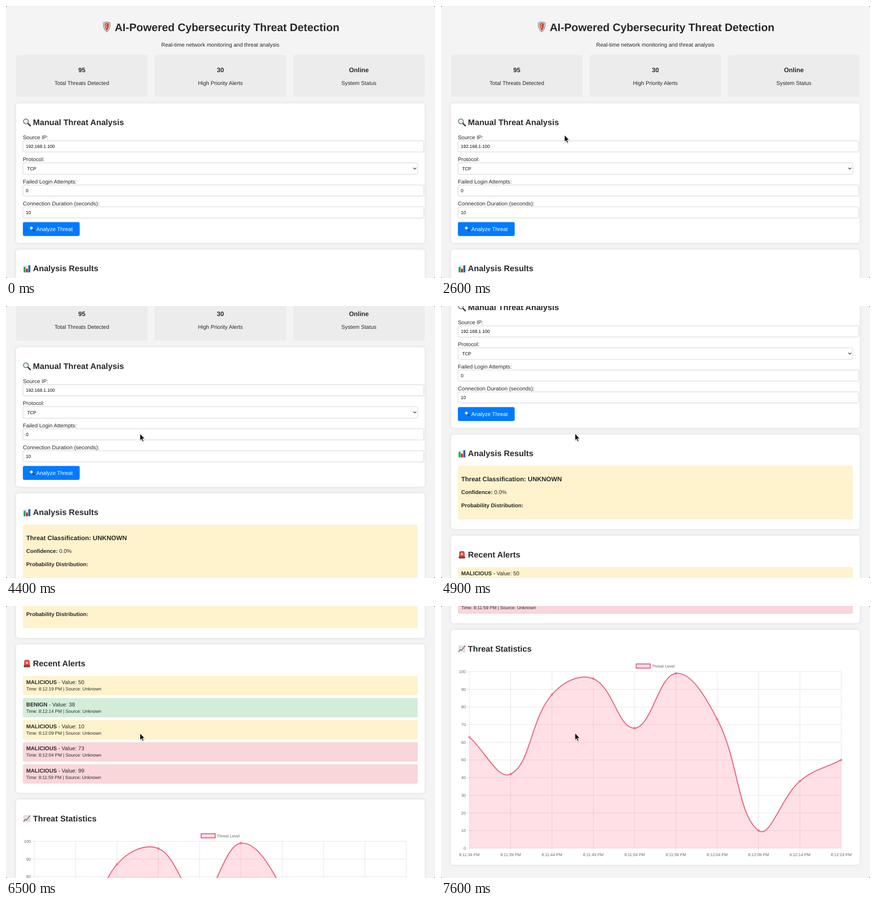
An HTML page that plays this animation: 939 by 596 pixels, repeating every 8000 ms.

```html
<!DOCTYPE html>
<html lang="en">
<head>
<meta charset="utf-8">
<title>Threat Detection Dashboard</title>
<style>
  html, body { margin: 0; width: 100%; height: 100%; overflow: hidden; background: #f4f4f4; }
  svg { display: block; width: 939px; height: 596px; }
  text { font-family: "Liberation Sans", Arial, Helvetica, sans-serif; fill: #292929; text-rendering: geometricPrecision; white-space: pre; }
  .b { font-weight: bold; }
  .in { fill: #000; }
  .tick { fill: #666; }
  .card { fill: #fff; filter: url(#soft); }
  .field { fill: #fff; stroke: #cecece; stroke-width: 1; }
</style>
</head>
<body>
<svg id="stage" viewBox="0 0 939 596" xmlns="http://www.w3.org/2000/svg">
  <defs>
    <filter id="soft" filterUnits="userSpaceOnUse" x="0" y="190" width="939" height="1449">
      <feDropShadow dx="0" dy="0" stdDeviation="3.7" flood-color="#000" flood-opacity=".1"/>
    </filter>
    <filter id="drop" x="-50%" y="-50%" width="200%" height="200%">
      <feDropShadow dx="0" dy="1" stdDeviation="1" flood-color="#000" flood-opacity=".35"/>
    </filter>
    <g id="lens">
      <path d="M10.8 10.4L16.2 15.8" stroke="#3a3a3c" stroke-width="3" stroke-linecap="round"/>
      <circle cx="6.6" cy="6.3" r="5.4" fill="#dcebf2" stroke="#55585c" stroke-width="1.3"/>
      <path d="M3.6 5.6Q4.2 3.4 6.6 3" fill="none" stroke="#fff" stroke-width="1.4"/>
    </g>
    <g id="bars">
      <rect x="1" y="1" width="15.5" height="16" fill="#e6edf3"/>
      <path d="M1 5H16.500M1 9H16.500M1 13H16.500" stroke="#cbd7e0" stroke-width=".6"/>
      <rect x="1.600" y="5" width="4.200" height="12" fill="#27a844"/>
      <rect x="6.800" y="9" width="4.200" height="8" fill="#c9252d"/>
      <rect x="12" y="1.600" width="4.200" height="15.400" fill="#1d64b8"/>
    </g>
    <g id="siren">
      <rect x="1.800" y="12.400" width="14" height="4.600" rx="1.400" fill="#74413f"/>
      <path d="M2.600 13.400L3.200 3.200Q3.500 1 5.600 1H12Q14.200 1 14.400 3.200L15 13.400Z" fill="#df3a30"/>
      <path d="M8.800 3.800V10.600M5.600 5.400L12 9.200M12 5.400L5.600 9.200" stroke="#ffd9d2" stroke-width="1.200"/>
    </g>
    <g id="trend">
      <rect x="1" y="1" width="15.500" height="16" fill="#e3eaee"/>
      <path d="M1 5H16.500M1 9H16.500M1 13H16.500M5 1V17M9 1V17M13 1V17" stroke="#c5d1d9" stroke-width=".6"/>
      <path d="M1.400 15.800L5 10.800L8.400 11.600L15.800 2" fill="none" stroke="#b8353a" stroke-width="1.500"/>
    </g>
    <g id="shield">
      <path d="M1 2Q9 -1.500 17 2Q19 16 9 24Q-1 16 1 2Z" fill="#969a9e"/>
      <path d="M2.600 3.200Q9 .6 15.400 3.200Q16.800 15 9 22Q1.200 15 2.600 3.200Z" fill="#d8dadc"/>
      <path d="M4.500 4.200Q9 2.400 13.500 4.200Q14.600 14 9 20Q3.400 14 4.500 4.200Z" fill="#d2452f"/>
      <path d="M6 5L9 7.500L6 10L9 12.500L6.500 15" fill="none" stroke="#f3c9bd" stroke-width="1.100"/>
    </g>
  </defs>
  <rect width="939" height="596" fill="#f4f4f4"/>
  <g id="page"></g>
  <g id="cursor">
    <path id="arrow" filter="url(#drop)" d="M.3 .3V15.200L3.600 12.100L5.900 17.400L8.300 16.400L6 11.200H10.600Z" fill="#000" stroke="#fff" stroke-width="1" stroke-linejoin="round"/>
    <path id="hand" filter="url(#drop)" d="M4 1.500Q5.500 0 6.500 1.700V7L12 8.300Q14 9 13.600 11.400L12.600 17.500H5.600L1.200 11.600Q.4 9.800 2.300 10L4 11.300Z" fill="#fff" stroke="#000" stroke-width="1"/>
    <path id="beam" d="M-2.500 -7Q0 -7 0 -5V5Q0 7 -2.500 7M2.500 -7Q0 -7 0 -5M0 5Q0 7 2.500 7" fill="none" stroke="#222" stroke-width="1"/>
  </g>
  <path d="M0 0H2L0 2ZM939 0V2L937 0ZM0 596V594L2 596ZM939 596H937L939 594Z" fill="#333"/>
</svg>
<script>
const NS = "http://www.w3.org/2000/svg";
const $ = id => document.getElementById(id);
const page = $("page");

function add(tag, attrs, parent = page) {
  const el = document.createElementNS(NS, tag);
  for (const k in attrs) el.setAttribute(k, attrs[k]);
  return parent.appendChild(el);
}
const rect = (x, y, width, height, rx, rest) => add("rect", { x, y, width, height, rx, ...rest });
const icon = (id, x, y, scale = 1) => add("use", { href: "#" + id, transform: `translate(${x} ${y}) scale(${scale})` });
function text(str, x, y, size, rest) {
  const el = add("text", { x, y, "font-size": size, ...rest });
  el.textContent = str;
  return el;
}
// Bold lead followed by plain text on one line
function pair(lead, tail, x, y) {
  const el = text("", x, y, BASE);
  add("tspan", { class: "b" }, el).textContent = lead;
  add("tspan", {}, el).textContent = tail;
}

const BASE = 11.93, H1 = 23.86, H2 = 17.89, H3 = 13.96, SMALL = 9.94, TICK = 8.95;
const bold = { class: "b" }, mid = { "text-anchor": "middle" };
const YELLOW = "#fef3cd", GREEN = "#d4edda", RED = "#f8d6da";

function header() {
  icon("shield", 211.6, 34);
  text("AI-Powered Cybersecurity Threat Detection", 237.9, 54.8, H1, bold);
  text("Real-time network monitoring and threat analysis", 469, 89, BASE, mid);
  [["95", "Total Threats Detected"], ["30", "High Priority Alerts"], ["Online", "System Status"]].forEach(([value, label], i) => {
    const x = 22 + i * 303.2;
    rect(x, 107.3, 288, 91.5, 4, { fill: "#ececec" });
    text(value, x + 144, 144.7, H3, { ...bold, ...mid });
    text(label, x + 144, 172.8, BASE, mid);
  });
}

function section(y, bottom, glyph, title) {
  rect(22, y, 894.3, bottom - y, 6, { class: "card" });
  icon(glyph, 37, y + 33);
  text(title, 59.1, y + 47.7, H2, bold);
}

const inputs = [295.5, 392.1, 440.1].map(y => ({ y, h: 24.4 }));

function form() {
  section(213.6, 519, "lens", "Manual Threat Analysis");
  [["Source IP:", 292.3], ["Protocol:", 340.2], ["Failed Login Attempts:", 388.8], ["Connection Duration (seconds):", 436.8]]
    .forEach(([s, y]) => text(s, 36.9, y, BASE));
  ["192.168.1.100", "0", "10"].forEach((s, i) => {
    const { y, h } = inputs[i];
    rect(37.2, y, 877.4, h, 3, { class: "field" });
    text(s, 43.5, y + 15.7, SMALL, { class: "in" });
    if (i) inputs[i].spin = spinner(y + 6.6);
  });
  rect(37.2, 343.6, 864, 25.3, 3, { class: "field" });
  text("TCP", 46.4, 359.6, SMALL, { class: "in" });
  add("path", { d: "M891.700 354.500L894.800 357.500L897.900 354.500", fill: "none", stroke: "#222", "stroke-width": 1.2 });
  rect(36.9, 473.6, 124.4, 30.4, 3.7, { fill: "#007bff" });
  icon("lens", 51, 482.3, 0.68);
  text("Analyze Threat", 66.2, 493.1, BASE, { fill: "#fff", style: "fill:#fff" });
}

function spinner(y) {
  const g = add("g", { visibility: "hidden" });
  add("rect", { x: 896.6, y, width: 11.2, height: 11.2, fill: "#efefef" }, g);
  add("path", { d: `M899.700 ${y + 4.2}l2.500 -2.600l2.500 2.600zM899.700 ${y + 7}l2.500 2.600l2.500 -2.600z`, fill: "#555" }, g);
  return g;
}

function results() {
  section(533.7, 740.8, "bars", "Analysis Results");
  rect(36.9, 602, 864.5, 117.8, 4, { fill: YELLOW });
  text("Threat Classification: UNKNOWN", 44.3, 635.8, H3, bold);
  pair("Confidence:", " 0.0%", 44.3, 664.2);
  pair("Probability Distribution:", "", 44.3, 693.4);
}

function alerts() {
  section(755.2, 1080.5, "siren", "Recent Alerts");
  [["MALICIOUS", 50, "8:12:19", YELLOW], ["BENIGN", 38, "8:12:14", GREEN], ["MALICIOUS", 10, "8:12:09", YELLOW],
   ["MALICIOUS", 73, "8:12:04", RED], ["MALICIOUS", 99, "8:11:59", RED]].forEach(([kind, value, time, fill], i) => {
    const y = 824.2 + i * 48.4;
    rect(36.9, y, 864.5, 42.4, 3.7, { fill });
    pair(kind, " - Value: " + value, 44.3, y + 18);
    text(`Time: ${time} PM | Source: Unknown`, 44.3, y + 31.9, SMALL);
  });
}

function chart() {
  section(1095, 1610, "trend", "Threat Statistics");
  const left = 62, right = 876, top = 1186.8, bottom = 1573.8;
  const values = [63, 42, 87, 96, 68, 99, 73, 10, 38, 50];
  const step = (right - left) / 9;
  const pts = values.map((v, i) => [left + i * step, bottom - v * (bottom - top) / 100]);
  const line = "#e8647f", wash = "rgba(255,99,132,.2)";

  rect(427.2, 1170, 30.6, 9, 0, { fill: wash, stroke: line, "stroke-width": 2.2 });
  text("Threat Level", 461.6, 1178.1, TICK, { class: "tick" });

  let grid = "";
  for (let i = 0; i <= 10; i++) {
    const y = bottom - i * (bottom - top) / 10;
    grid += `M${left - 6} ${y}H${right}`;
    text(i * 10, 54.2, y + 3.1, TICK, { class: "tick", "text-anchor": "end" });
  }
  pts.forEach(([x], i) => {
    grid += `M${x} ${top}V${bottom + 6}`;
    const sec = 34 + i * 5;
    const stamp = `8:${11 + Math.floor(sec / 60)}:${String(sec % 60).padStart(2, "0")} PM`;
    text(stamp, x, 1590.5, TICK, { class: "tick", ...mid });
  });
  add("path", { d: grid, stroke: "rgba(0,0,0,.11)", "stroke-width": 1 });

  const dist = (a, b) => Math.hypot(a[0] - b[0], a[1] - b[1]);
  const ctrl = pts.map((p, i) => {
    const a = pts[i - 1] || p, b = pts[i + 1] || p;
    const da = dist(a, p), db = dist(p, b), k = 0.4 / (da + db);
    const at = f => [p[0] + f * (b[0] - a[0]), Math.min(bottom, Math.max(top, p[1] + f * (b[1] - a[1])))];
    return { before: at(-k * da), after: at(k * db) };
  });
  let d = "M" + pts[0];
  for (let i = 1; i < pts.length; i++) d += `C${ctrl[i - 1].after} ${ctrl[i].before} ${pts[i]}`;
  add("path", { d: `${d}V${bottom}H${left}Z`, fill: wash });
  add("path", { d, fill: "none", stroke: line, "stroke-width": 2.2 });
  pts.forEach(([cx, cy]) => add("circle", { cx, cy, r: 2.2, fill: wash, stroke: line, "stroke-width": 0.9 }));
}

header();
form();
results();
alerts();
chart();

// Keyframes: [ms, value...]
const SCROLL = [[3600, 0], [3700, 13], [3800, 13], [3900, 36], [4000, 49], [4100, 56], [4200, 56], [4300, 82], [4500, 164],
  [4700, 225], [4900, 252], [5000, 252], [5100, 310], [5200, 412], [5300, 468], [5600, 468], [5700, 479], [6000, 570],
  [6500, 671], [6600, 700], [6800, 790], [7100, 872], [7200, 872], [7300, 920], [7600, 1043]];
const POINTER = [[100, 465, 574], [200, 463, 504], [400, 463, 504], [1300, 132, 485], [1500, 132, 485], [2400, 252, 324],
  [2600, 270, 282.5], [2800, 270, 282.5], [3700, 293, 280], [4900, 293, 279.3], [7600, 293, 278.3]];

function sample(keys, t, ease = u => u) {
  const i = keys.findIndex(k => k[0] > t);
  if (i === 0) return keys[0].slice(1);
  if (i < 0) return keys[keys.length - 1].slice(1);
  const a = keys[i - 1], b = keys[i], u = ease((t - a[0]) / (b[0] - a[0]));
  return a.slice(1).map((v, j) => v + (b[j + 1] - v) * u);
}
const smooth = u => u * u * (3 - 2 * u);
const show = (el, on) => el.setAttribute("visibility", on ? "visible" : "hidden");

function render(ms) {
  const t = Math.floor((ms % 8000) / 100 + 0.001) * 100;
  const [scroll] = sample(SCROLL, t);
  const [x, y] = sample(POINTER, t, smooth);
  page.setAttribute("transform", `translate(0 ${-scroll})`);

  const over = scroll ? null : inputs.find(f => y > f.y && y < f.y + f.h);
  inputs.forEach(f => f.spin && show(f.spin, f === over));
  const onButton = !scroll && x < 161 && y > 474 && y < 504;
  const seen = t >= 100;
  show($("hand"), seen && onButton);
  show($("beam"), seen && over);
  show($("arrow"), seen && !onButton && !over);
  $("cursor").setAttribute("transform", `translate(${x} ${y})`);
}

const start = performance.now();
function tick() {
  render(performance.now() - start);
  requestAnimationFrame(tick);
}
tick();
</script>
</body>
</html>
```
